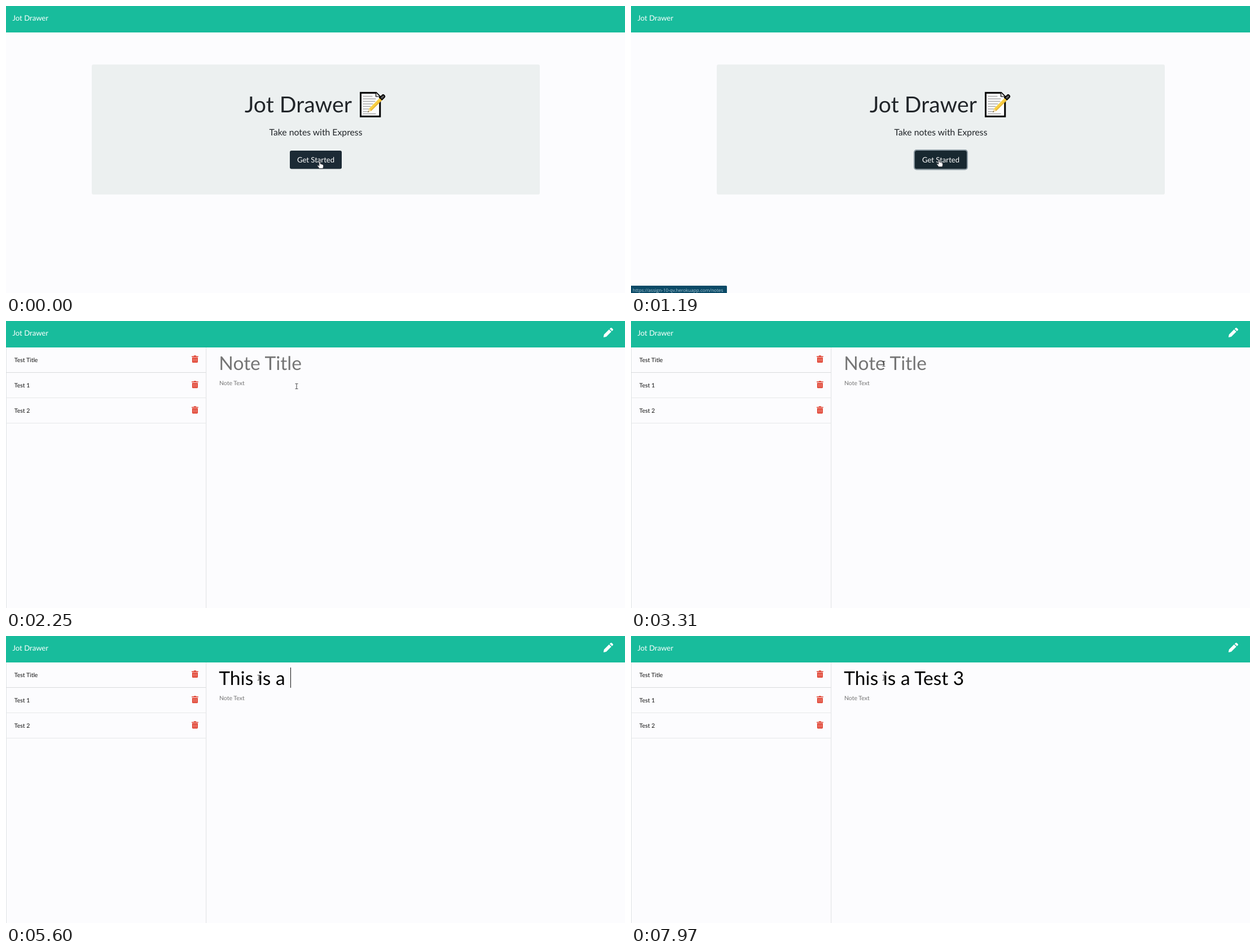
These frames come from a looping animation (1097 by 510 pixels, 8000 ms). An HTML page:

```html
<!DOCTYPE html>
<html lang="en">
<head>
<meta charset="utf-8">
<title>Jot Drawer</title>
<style>
  html, body { margin: 0; width: 100%; height: 100%; overflow: hidden; background: #fcfcfe; }
  svg { display: block; width: 100vw; height: 100vh; }
  text { font-family: Lato, sans-serif; white-space: pre; text-rendering: geometricPrecision; }
  .small { font-size: 10.5px; }
  .big { font-size: 33.6px; }
  .hint { fill: #757575; }
  #beam { mix-blend-mode: difference; }
</style>
</head>
<body>
<svg viewBox="0 0 1097 510">
  <defs>
    <g id="bin">
      <path d="M0 1.7h3.4l.9-1.2h3.2l.9 1.2h3.4v1.5H0zM.9 4h10v8a1.3 1.3 0 0 1-1.3 1.3H2.2A1.3 1.3 0 0 1 .9 12z" fill="#e0402f"/>
      <path d="M3.4 5.6v6M5.9 5.6v6M8.4 5.6v6" stroke="#f6bdb6" stroke-width=".8"/>
    </g>
  </defs>
  <rect width="1097" height="510" fill="#fcfcfe"/>

  <g id="home">
    <rect x="152" y="104" width="794" height="231" rx="3" fill="#ecf0f0"/>
    <text x="423" y="189" font-size="39.2" fill="#212529">Jot Drawer</text>
    <g stroke-linejoin="round">
      <path d="M628.5 154.2h27.500l6.8 6.8v35.300h-34.300z" fill="#fdfdfd" stroke="#000" stroke-width="3" stroke-linejoin="miter"/>
      <path d="M655.500 154v7h7" fill="#ddd" stroke="#000" stroke-width="1.2"/>
      <path d="M632.500 160.500h17M632.500 165h23M632.500 169.500h22M632.500 174h18M632.500 178.500h14M632.500 183h11M632.500 187.500h8M632.500 191.500h23" stroke="#a9a9a9" stroke-width="1.3"/>
      <path d="M641 188.800l2.200-6.200 21.500-21.500 4 4-21.500 21.500z" fill="#f8cf43"/>
      <path d="M647.200 186.600l21.500-21.500-1.200-1.200-21.600 21.600z" fill="#e5b234"/>
      <path d="M641 188.800l2.200-6.200 4 4z" fill="#f3ddb0"/>
      <path d="M641 188.800l.8-2.300 1.500 1.500z" fill="#222"/>
      <path d="M662.500 162.800l4-4a2.600 2.600 0 0 1 3.800 3.800l-4 4z" fill="#5a5a5a" stroke="#000" stroke-width="1.900"/>
    </g>
    <text x="549" y="230" font-size="15.75" fill="#212529" text-anchor="middle">Take notes with Express</text>
    <rect id="ring" x="502" y="256" width="94" height="34.500" rx="4" fill="none" stroke="#8b99a2" stroke-width="2.100"/>
    <rect id="button" x="503" y="257" width="92" height="32.500" rx="3"/>
    <text x="549" y="277.600" font-size="13.125" fill="#fff" text-anchor="middle">Get Started</text>
  </g>

  <g id="notes">
    <path d="M.5 47v463M354.700 47v463" stroke="#dfe2e4"/>
    <g id="list"></g>
    <text id="titleHint" class="big hint" x="377.300" y="87">Note Title</text>
    <text id="title" class="big" x="377.300" y="87"></text>
    <rect id="caret" y="56" width="1" height="36" fill="#111"/>
    <text class="small hint" x="378" y="114.200">Note Text</text>
  </g>

  <rect width="1097" height="47" fill="#18bc9c"/>
  <text x="11.500" y="26" font-size="13.125" fill="#fff">Jot Drawer</text>
  <path id="pencil" fill="#fff" d="M1058.800 29l1-5 9-9 4 4-9 9zM1069.800 14l1.600-1.500a1.700 1.700 0 0 1 2.400 0l1.700 1.700a1.700 1.700 0 0 1 0 2.400l-1.600 1.500z"/>

  <g id="link">
    <path d="M0 497h168.500a1.500 1.500 0 0 1 1.500 1.500V510H0z" fill="#0b4a67"/>
    <text x="3" y="507.600" style="font-family:'Open Sans',sans-serif" font-size="8.1" fill="#a9c9d6">https://assign-10-qv.herokuapp.com/notes</text>
  </g>
  <g id="hand">
    <path transform="scale(.93)" d="M-1.200.9a1.200 1.200 0 0 1 2.400 0v4.200q2-.5 2.300.6 1.700-.4 2 .7 1.400-.2 1.400 1.300v2.400q0 2-1.200 3.600H-.9Q-2 11.500-3.900 9.400q-1-1.500.2-1.900 1.100-.2 2.500 1.500z" fill="#fff" stroke="#2a2a33" stroke-width=".85" stroke-linejoin="round"/>
  </g>
  <path id="beam" d="M-2.500-4.500h2l.5.500.5-.5h2M0-4v8M-2.500 4.500h2L0 4l.5.500h2" fill="none" stroke="#aaa" stroke-width="1.100"/>
</svg>
<script>
const LOOP = 8000, PAGE = 1360, CLICK = 3440, BLINK = 500;
const TEXT = 'This is a Test 3';
const KEYS = [4240, 4450, 4580, 4700, 4840, 4970, 5120, 5300, 5430, 5600, 6230, 6450, 6540, 6640, 7250, 7460];
// time, x, y of the pointer's hot spot
const PATH = [
  [130, 556, 276], [510, 546, 273], [1400, 546, 273], [2160, 515, 116],
  [2460, 515, 116], [2720, 493, 122], [3220, 448, 78], [3400, 448, 74]
];

const el = {};
document.querySelectorAll('[id]').forEach(n => el[n.id] = n);
el.list.innerHTML = ['Test Title', 'Test 1', 'Test 2'].map((name, i) => {
  const y = 47 + i * 45.2;
  return `<text class="small" x="14.8" y="${y + 26}" fill="#111">${name}</text>
    <use href="#bin" x="329" y="${y + 13.7}"/>
    <path d="M0 ${Math.round(y + 45) - .5}h354.5" stroke="${i ? '#e6e8e9' : '#d9dbdd'}"/>`;
}).join('');

const clamp = v => Math.max(0, Math.min(1, v));
const ramp = (t, a, b) => clamp((t - a) / (b - a));
const ease = u => u * u * (3 - 2 * u);
const show = (node, on) => node.style.display = on ? '' : 'none';

function pointer(t) {
  let [, x, y] = PATH[0];
  for (let i = 1; i < PATH.length; i++) {
    const u = ease(ramp(t, PATH[i - 1][0], PATH[i][0]));
    x += (PATH[i][1] - PATH[i - 1][1]) * u;
    y += (PATH[i][2] - PATH[i - 1][2]) * u;
  }
  return `translate(${x.toFixed(2)} ${y.toFixed(2)})`;
}

function draw(t) {
  const onNotes = t >= PAGE;
  show(el.home, !onNotes);
  show(el.notes, onNotes);
  show(el.pencil, onNotes);
  show(el.list, t >= 1500);

  el.ring.style.opacity = ramp(t, 960, 1150);
  el.button.style.fill = t < 980 ? '#1c2a35' : '#182830';
  el.link.style.opacity = ramp(t, 130, 420) - ramp(t, 1480, 1700);

  const typed = KEYS.filter(k => k <= t).length;
  el.title.textContent = TEXT.slice(0, typed);
  show(el.titleHint, !typed);
  const since = t - (typed ? KEYS[typed - 1] : CLICK);
  show(el.caret, since >= 0 && Math.floor(since / BLINK) % 2 === 0);
  const width = typed ? el.title.getComputedTextLength() : 0;
  el.caret.setAttribute('x', Math.round(377.6 + width));

  const beam = t >= 1440;
  show(el.hand, !beam);
  show(el.beam, beam);
  (beam ? el.beam : el.hand).setAttribute('transform', pointer(t));
}

const start = performance.now();
function tick() {
  draw((performance.now() - start) % LOOP);
  requestAnimationFrame(tick);
}
tick();
</script>
</body>
</html>
```
